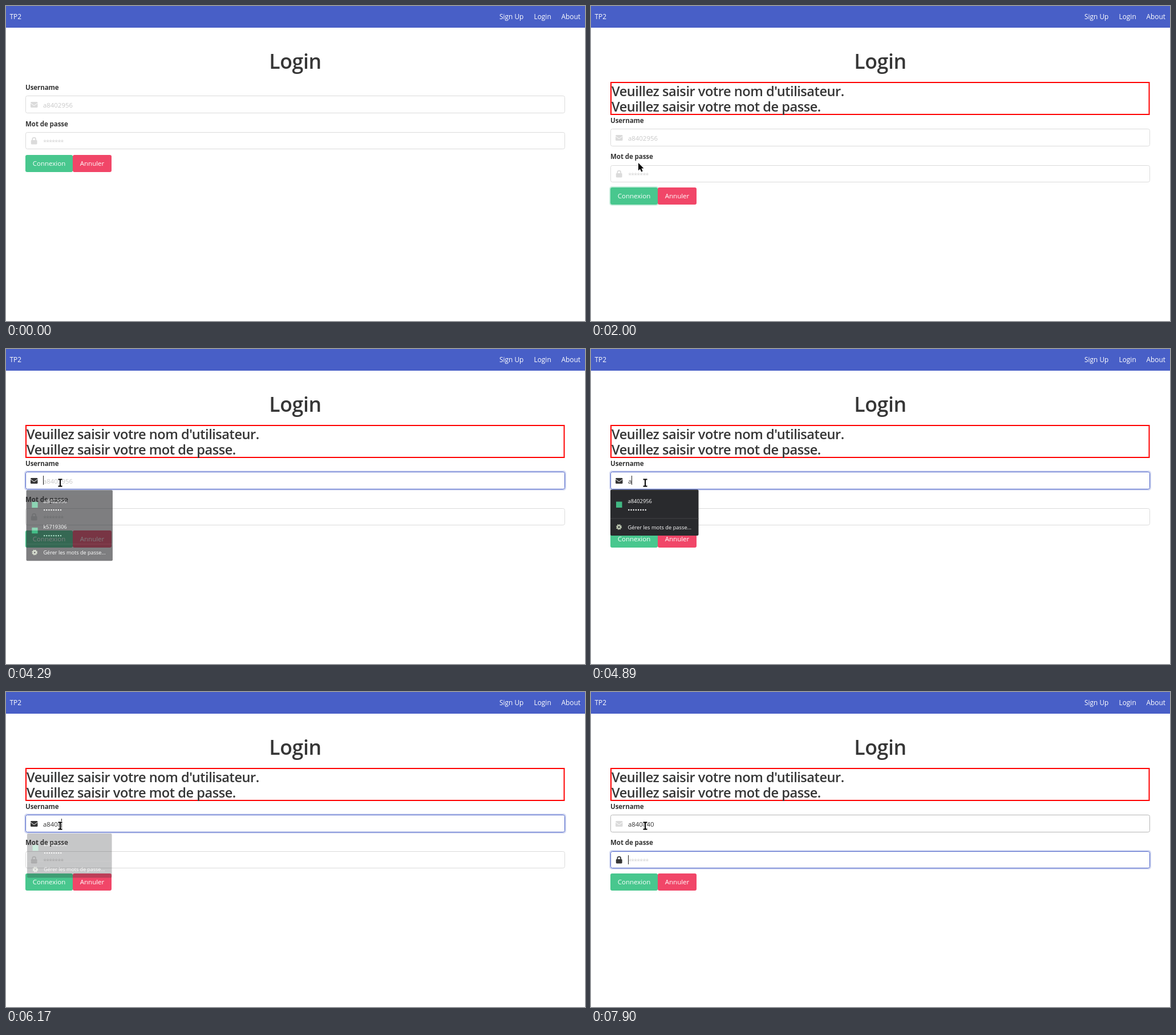
An HTML page for the animation above (8000 ms loop, 1015 by 552 pixels).

```html
<!DOCTYPE html>
<html lang="fr">
<head>
<meta charset="utf-8">
<title>Login</title>
<style>
  html, body { margin: 0; width: 100%; height: 100%; overflow: hidden; background: #fff; }
  svg { display: block; width: 1015px; height: 552px; font: 11.4px "Open Sans", "Noto Sans", sans-serif; fill: #363636; }
  text { white-space: pre; }
  .nav { font-size: 11.9px; fill: #fff; }
  .title { font-size: 35.6px; font-weight: 600; letter-spacing: -.01em; text-anchor: middle; }
  .error { font-size: 23.6px; font-weight: 600; letter-spacing: -.02em; }
  .label { font-size: 11.6px; font-weight: 700; letter-spacing: -.01em; }
  .hint { fill: #363636; opacity: .27; }
  .stars { letter-spacing: -.11em; opacity: .2; }
  .box { fill: #fff; stroke: #dbdbdb; }
  .ring { fill: none; stroke: #485fc7; stroke-opacity: .25; stroke-width: 2; visibility: hidden; }
  .icon { color: #dbdbdb; fill: currentColor; }
  .hover .box { stroke: #b5b5b5; }
  .focus .box { stroke: #485fc7; }
  .focus .ring { visibility: visible; }
  .focus .icon { color: #363636; }
  .button { font-size: 11.5px; fill: #fff; text-anchor: middle; }
  .caret { stroke: #222; }
  .popup { font-size: 9.3px; fill: #fff; }
  .dots { stroke: #fff; stroke-width: 2.4; stroke-linecap: round; stroke-dasharray: 0 4.2; }
  .outline { fill: #fff; stroke: #fff; stroke-linejoin: round; }
</style>
</head>
<body>
<svg viewBox="0 0 1015 552">
  <rect width="1015" height="38" fill="#485fc7"/>
  <g class="nav">
    <text x="6.5" y="23">TP2</text>
    <text x="865" y="23">Sign Up</text>
    <text x="925.5" y="23">Login</text>
    <text x="973.5" y="23">About</text>
  </g>
  <text class="title" x="507" y="110">Login</text>

  <g id="error" class="error">
    <rect x="35" y="134" width="943.5" height="56" fill="none" stroke="#f00" stroke-width="2"/>
    <text x="36" y="158">Veuillez saisir votre nom d'utilisateur.</text>
    <text x="36" y="185">Veuillez saisir votre mot de passe.</text>
  </g>

  <g id="userLabel"><text class="label" x="34">Username</text></g>
  <g id="user">
    <rect class="ring" x="33" y="-1" width="948" height="33" rx="4"/>
    <rect class="box" x="34.5" y=".5" width="945" height="30" rx="3"/>
    <g class="icon">
      <rect x="43" y="11" width="12.5" height="10" rx="1.5"/>
      <path d="M43 13.3L49.2 17.7 55.5 13.3" fill="none" stroke="#fff"/>
    </g>
    <text id="userHint" class="hint" x="65" y="21">a8402956</text>
    <text id="typed" x="65" y="21"></text>
  </g>
  <g id="passLabel"><text class="label" x="34">Mot de passe</text></g>
  <g id="pass">
    <rect class="ring" x="33" y="-1" width="948" height="32" rx="4"/>
    <rect class="box" x="34.5" y=".5" width="945" height="29" rx="3"/>
    <g class="icon">
      <rect x="43.8" y="14" width="10.8" height="7.5" rx="1.4"/>
      <path d="M46.3 14.5V12.6a2.9 2.9 0 0 1 5.8 0V14.5" fill="none" stroke="currentColor" stroke-width="1.8"/>
    </g>
    <text class="hint stars" x="65" y="21">*******</text>
  </g>
  <g id="buttons">
    <rect id="okRing" x="33" y="-1" width="85" height="32" rx="4" fill="none" stroke="#48c78e" stroke-opacity=".3" stroke-width="2"/>
    <rect id="ok" x="34" width="83" height="30" rx="3"/>
    <rect x="117" width="68" height="30" rx="3" fill="#f14668"/>
    <g class="button">
      <text x="75.5" y="19.3">Connexion</text>
      <text x="151" y="19.3">Annuler</text>
    </g>
  </g>
  <path id="caret" class="caret" d="M0 7V23"/>

  <g id="popup" class="popup"></g>
  <g id="cursor"></g>
</svg>
<script>
const LOOP = 8000, SHIFT = 57.6, ENTRY = 46;
const rows = { userLabel: 147, user: 157.2, passLabel: 210.6, pass: 221, buttons: 260.7 };
const $ = id => document.getElementById(id);

const entry = (name, y) => `
  <rect x="44" y="${y - 5.5}" width="10.5" height="10.5" fill="#41b883"/>
  <text x="64.5" y="${y - 3.5}">${name}</text>
  <path class="dots" d="M66.3 ${y + 9}h30"/>`;

function popupMarkup(count) {
  const extra = (count - 1) * ENTRY;
  const names = ["a8402956", "k5719306"].slice(0, count);
  return `<rect x="34" y="246.5" width="154.5" height="${80.5 + extra}" rx="2" fill="#292a2d"/>
    ${names.map((name, i) => entry(name, 273 + i * ENTRY)).join("")}
    <g transform="translate(0 ${extra})">
      <path d="M34 297H188.5" stroke="#424346"/>
      <circle cx="49" cy="312" r="2.7" fill="none" stroke="#c0cbb4" stroke-width="2.2"/>
      <circle cx="49" cy="312" r="4.3" fill="none" stroke="#c0cbb4" stroke-width="1.4" stroke-dasharray="2 1.38"/>
      <text x="64.5" y="315.5">Gérer les mots de passe...</text>
    </g>`;
}

const double = (d, attrs, width) =>
  `<path class="outline" d="${d}" stroke-width="${width}"/><path d="${d}" fill="#000" ${attrs}/>`;
const cursors = {
  none: "",
  arrow: double("M0 0V13.2L3 10.4 5.2 15.6 7.6 14.6 5.4 9.6 9.4 9.4Z", "", 1.4),
  hand: double("M-1.2.2Q0-1.4 1.2.2V5.5L6.2 6.8Q8 7.3 7.7 9.3L6.8 15H-.6L-5 9.3Q-4.5 7.4-2.8 8.4L-1.2 9.6Z", "", 1.4),
  beam: double("M-3.5-6H3.5M0-6V6M-3.5 6H3.5", 'stroke="#000" stroke-width="2"', 4)
};

const at = (cursor, x, y, more) => ({ cursor, x, y, ...more });

// Each step changes part of the state and holds until the next one.
const steps = [
  [0, { cursor: "none", x: 0, y: 0, error: false, ok: "#48c78e", okFocus: false,
        hover: "", focus: "", text: "", caret: false, entries: 0, fade: 1, scale: 1 }],
  [710, at("arrow", 373, 478)],
  [780, at("arrow", 285, 432)],
  [850, at("arrow", 190, 388)],
  [920, at("arrow", 142, 354)],
  [990, at("arrow", 121, 334)],
  [1060, at("arrow", 107, 317)],
  [1130, at("arrow", 96, 300)],
  [1200, at("hand", 88, 284, { ok: "#3ec487" })],
  [1270, at("hand", 83, 275)],
  [1670, { ok: "#3abb81", okFocus: true }],
  [1740, { error: true, ok: "#3ec487" }],
  [1810, { cursor: "arrow", ok: "#48c78e" }],
  [3410, at("arrow", 84, 271)],
  [3480, at("arrow", 86, 262)],
  [3550, at("arrow", 89, 252)],
  [3620, at("beam", 92, 243, { hover: "user" })],
  [3690, at("beam", 94, 238)],
  [3760, at("beam", 95, 235.5)],
  [4220, { y: 234.5, focus: "user", okFocus: false, caret: true }],
  [4290, { entries: 2, fade: .6, scale: .98 }],
  [4360, { fade: 1, scale: 1 }],
  [4760, { text: "a" }],
  [4890, { entries: 1 }],
  [5240, { text: "a8" }],
  [5500, { text: "a84" }],
  [5700, { text: "a840" }],
  [6030, { text: "a8408" }],
  [6100, { fade: .7, scale: .985 }],
  [6170, { fade: .26, scale: .962 }],
  [6240, { fade: .07, scale: .955, text: "a84084" }],
  [6310, { entries: 0 }],
  [6510, { text: "a840840" }],
  [6840, { focus: "pass" }],
  [7370, { caret: false }],
  [7900, { caret: true }]
];

const show = (id, on) => $(id).setAttribute("visibility", on ? "visible" : "hidden");
const move = (id, x, y) => $(id).setAttribute("transform", `translate(${x} ${y})`);

function draw(s) {
  const rowTop = id => Math.round(rows[id] + (s.error ? SHIFT : 0));
  show("error", s.error);
  for (const id in rows) move(id, 0, rowTop(id));
  for (const id of ["user", "pass"]) {
    $(id).setAttribute("class", s.focus === id ? "focus" : s.hover === id ? "hover" : "");
  }
  $("ok").setAttribute("fill", s.ok);
  show("okRing", s.okFocus);

  $("typed").textContent = s.text;
  show("userHint", !s.text);
  show("caret", s.caret);
  if (s.focus) {
    const end = s.focus === "user" && s.text ? $("typed").getComputedTextLength() : 0;
    move("caret", Math.round(65 + end) + .5, rowTop(s.focus));
  }

  $("popup").innerHTML = s.entries ? popupMarkup(s.entries) : "";
  $("popup").setAttribute("opacity", s.fade);
  $("popup").setAttribute("transform",
    `translate(111.2 286.7) scale(${s.scale}) translate(-111.2 -286.7)`);

  $("cursor").innerHTML = cursors[s.cursor];
  move("cursor", s.x, s.y);
}

const start = performance.now();
let shown = 0;
function frame() {
  const time = (performance.now() - start) % LOOP;
  const past = steps.filter(([t]) => t <= time);
  if (past.length !== shown) {
    shown = past.length;
    draw(Object.assign({}, ...past.map(([, change]) => change)));
  }
  requestAnimationFrame(frame);
}
frame();
</script>
</body>
</html>
```
